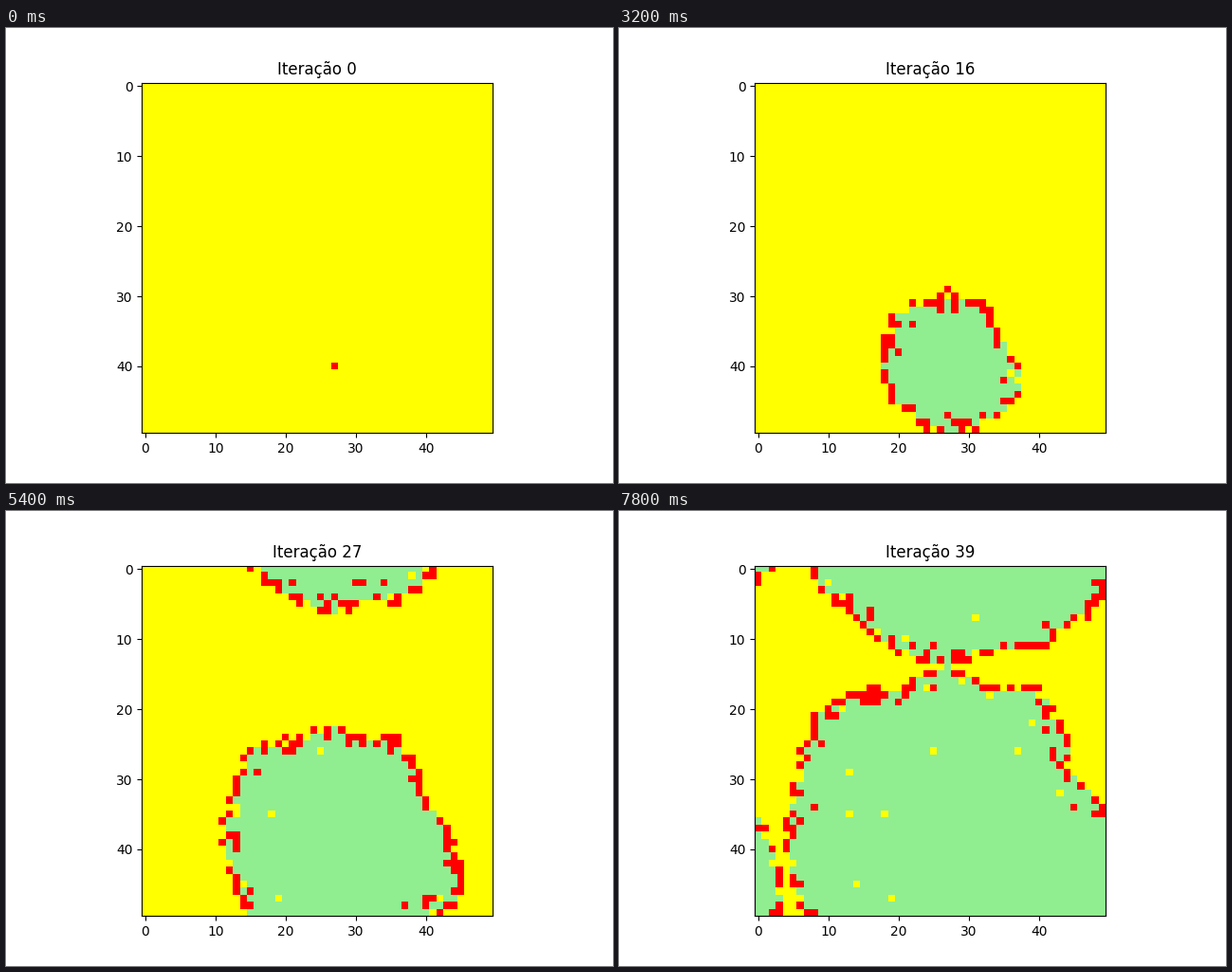
These frames come from a looping animation (640 px wide and 480 px high, 8 s). A matplotlib script:

```python
import itertools
import numpy as np
import matplotlib.pyplot as plt
from matplotlib.animation import FuncAnimation
from matplotlib.colors import ListedColormap

N = 50
STEPS = 40
START_COL, START_ROW = 27, 40
SPEED = 0.625  # cells per step

# Lobes of the front: direction (degrees clockwise from the right), relative speed
LOBES = [(15, 1.13), (60, 1.02), (75, 0.93), (90, 1.0), (120, 0.91),
         (165, 0.93), (205, 0.98), (228, 1.12), (255, 0.98), (270, 1.08),
         (285, 0.97), (300, 1.09), (330, 0.86)]


def arrival(dx, dy):
    """Time at which the front reaches an offset from the start."""
    angle = np.degrees(np.arctan2(dy, dx))
    return np.hypot(dx, dy) / (SPEED * np.interp(angle, *zip(*LOBES), period=360))


# The grid wraps around, so the nearest of the nine copies counts
rows, cols = np.indices((N, N))
front = np.min([arrival(cols - START_COL + sx, rows - START_ROW + sy)
                for sx, sy in itertools.product((-N, 0, N), repeat=2)], axis=0)

# Ragged edge with stragglers, a few spared trees, random burning time
rng = np.random.default_rng(7)
ignite = np.maximum(np.ceil(front - 0.5 + rng.exponential(0.9, (N, N))), 1)
ignite[(rng.random((N, N)) < 0.012) & (front > 12)] = np.inf
ignite[START_ROW, START_COL] = 0
burnt = ignite + rng.geometric(0.62, (N, N))


def forest(step):
    """0 = tree, 1 = burning, 2 = burnt."""
    return (step >= ignite).astype(int) + (step >= burnt)


fig, ax = plt.subplots(figsize=(6.4, 4.8), dpi=100)
image = ax.imshow(forest(0), vmin=0, vmax=2, interpolation="nearest",
                  cmap=ListedColormap(["yellow", "red", "lightgreen"]))
title = ax.set_title("Iteração 0")


def update(step):
    image.set_data(forest(step))
    title.set_text(f"Iteração {step}")
    return image, title


anim = FuncAnimation(fig, update, frames=STEPS, interval=200, repeat=True)
plt.show()
```
